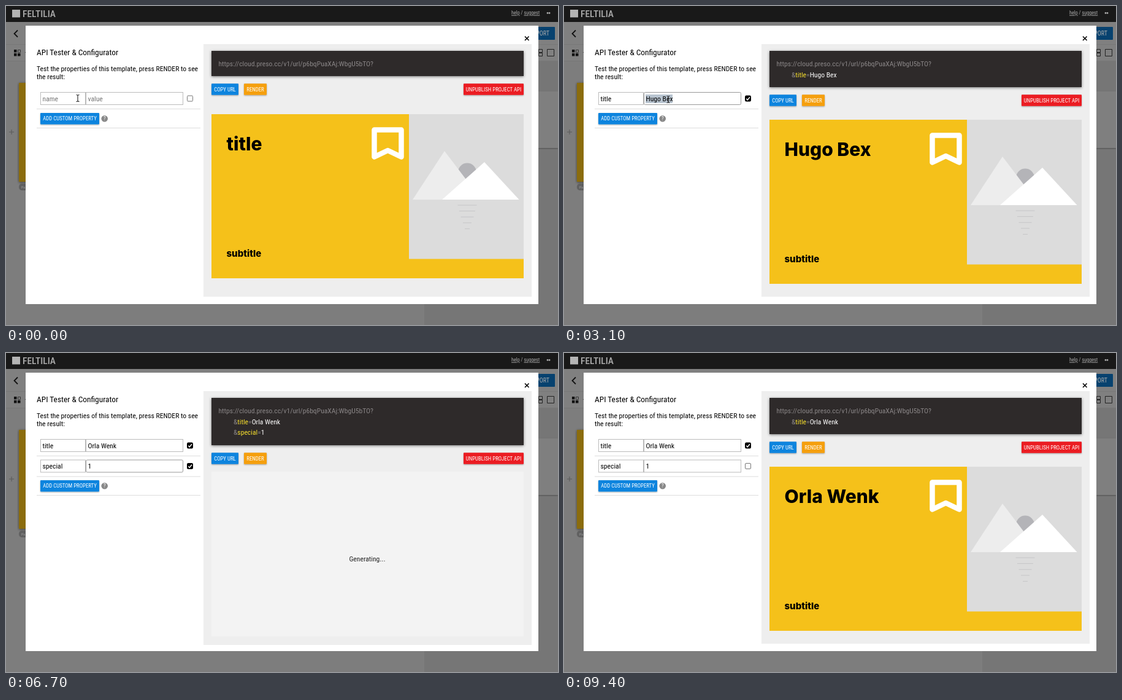
Animation of 900 by 519 pixels, one loop 9.5 s. Source, as an HTML page:

```html
<!DOCTYPE html>
<html lang="en">
<head>
<meta charset="utf-8">
<title>API Tester</title>
<style>
  html, body { margin: 0; width: 100%; height: 100%; overflow: hidden; background: #7d7d7d; }
  svg { display: block; font: 11.65px "Roboto Condensed", Roboto, sans-serif; font-stretch: condensed; }
  text { white-space: pre; }
  .card { font-family: Inter, sans-serif; font-stretch: normal; font-weight: 800; font-optical-sizing: none; }
</style>
</head>
<body>
<svg id="stage" width="900" height="519" viewBox="0 0 900 519">
  <defs>
    <filter id="soft" x="-10%" y="-30%" width="120%" height="160%">
      <feDropShadow dx="0" dy="1" stdDeviation="2.2" flood-opacity=".5"/>
    </filter>
    <filter id="low" x="-10%" y="-20%" width="120%" height="160%">
      <feDropShadow dx="0" dy="1" stdDeviation=".8" flood-opacity=".35"/>
    </filter>
  </defs>
  <g id="page"></g>
  <g id="live"></g>
</svg>
<script>
const LOOP = 9500, STEP = 100;
const FIRST = 'Hugo Bex', SECOND = 'Orla Wenk';
const BLUE = '#0a84de';

const rect = (x, y, w, h, fill, more = '') =>
  `<rect x="${x}" y="${y}" width="${w}" height="${h}" fill="${fill}" ${more}/>`;
const text = (x, y, s, fill = '#000', size = 11.65, more = '') =>
  `<text x="${x}" y="${y}" fill="${fill}" font-size="${size}" ${more}>${s}</text>`;
const line = (d, stroke, width = 1, more = '') =>
  `<path d="${d}" fill="none" stroke="${stroke}" stroke-width="${width}" ${more}/>`;
const button = (x, y, w, fill, label) =>
  rect(x, y, w, 18.5, fill, 'rx="1" filter="url(#low)"') +
  text(x + w / 2, y + 12.2, label, '#fff', 8.8, 'text-anchor="middle"');

const between = (t, from, to) => t >= from && t < to;
const typed = (t, s, start, step) => s.slice(0, Math.max(0, Math.floor((t - start) / step) + 1));

function page() {
  return rect(0, 0, 900, 519, '#7d7d7d') +
    rect(0, 26, 900, 63, '#808080') + rect(682, 89, 218, 430, '#767676') +
    line('M0 62.5H900M0 89.5H900', '#777') +
    rect(868, 139, 32, 92, '#7f7f7f', 'filter="url(#low)"') +
    rect(0, 0, 900, 26, '#191919') +
    rect(10, 6, 13, 12.5, '#b4b4b4') +
    text(27, 18, 'FELTILIA', '#aaa', 15.5, 'font-weight="500"') +
    text(824, 14, '<tspan text-decoration="underline">help</tspan> / <tspan text-decoration="underline">suggest</tspan>', '#aaa', 8.2) +
    '<circle cx="883" cy="11.5" r="1.4" fill="#aaa"/><circle cx="886" cy="11.5" r="1.4" fill="#aaa"/>' +
    line('M19 39.5L13.5 45L19 50.5', '#111', 1.8) +
    rect(13, 71, 4.5, 4.5, '#111') + rect(13, 77, 4.5, 4.5, '#111') + rect(19, 77, 4.5, 4.5, '#111') +
    line('M19.5 71.5h4v4h-4z', '#222', .8) + rect(31, 75, 2, 1, '#333') +
    rect(850, 34, 45, 21, '#07426f', 'rx="1"') +
    text(886, 48, 'EXPORT', '#aaa', 10, 'text-anchor="end"') +
    line('M868.5 70.5h6v5h-6zM868.5 76.5h6v5h-6zM882.5 70.5h11v11h-11z', '#222') +
    line('M5 205h8M9 201v8', '#5b5b5b') +
    rect(21, 125, 30, 161, '#8b6c0a', 'filter="url(#soft)"') +
    rect(21, 289, 40, 11, '#606060', 'rx="5"') + text(25, 297, 'Pa', '#999', 6) +
    rect(32, 32, 836, 453, '#fff') +
    line('M846 49.5l6.5 6.5m0-6.5l-6.5 6.5', '#000', 1.6) +
    text(50, 79.5, 'API Tester &amp; Configurator', '#000', 13.4) +
    text(50, 105.5, 'Test the properties of this template, press RENDER to see') +
    text(50, 119.3, 'the result:');
}

function checkbox(y, on) {
  return rect(295.5, y - 4.5, 9, 9, on ? '#000' : '#fff', `rx="1.5" stroke="${on ? '#000' : '#777'}"`) +
    (on ? line(`M297.3 ${y + .2}l2 2.2l3.6-4.6`, '#fff', 1.5) : '');
}

function field(x, y, w, value, hint, focus, caret, selected) {
  return rect(x + .5, y + .5, w - 1, 20, '#fff', focus ? 'rx="2" stroke="#999"' : 'stroke="#bbb"') +
    (selected ? rect(x + 3, y + 4, 44, 14, '#b8c4d0') : '') +
    text(x + 3.5, y + 14.5, (value || (caret ? '' : hint)) + (caret ? '<tspan dx="-1">|</tspan>' : ''),
      value ? '#000' : '#757575');
}

// start, end, row, column, time of the last key
const focusSpans = [
  [200, 650, 0, 0, 530], [650, 3300, 0, 1, 1120], [3300, 5000, 0, 1, 4100],
  [5200, 5900, 1, 0, 5800], [5900, 8200, 1, 1, 6000]
];

function form(t, names, values, checks) {
  const count = t >= 5000 ? 2 : 1;
  const [, , focusRow, focusCol, lastKey] = focusSpans.find(([from, to]) => between(t, from, to)) || [];
  const selected = between(t, 2900, 3300);
  const caretOn = !selected && (t < lastKey || (t - lastKey) % 1000 < 500);
  let out = '';
  for (let row = 0; row < count; row++) {
    const y = 140 + row * 33.5;
    [[56, 74, names, 'name'], [130, 159, values, 'value']].forEach(([x, w, list, hint], col) => {
      const active = focusRow === row && focusCol === col;
      out += field(x, y, w, list[row], hint, active, active && caretOn, active && selected);
    });
    out += checkbox(y + 10.5, checks[row]) + line(`M50 ${y + 27.5}H317`, '#ddd');
  }
  const y = 174 + (count - 1) * 33;
  return out + button(56, y, 96, BLUE, 'ADD CUSTOM PROPERTY') +
    `<circle cx="160.7" cy="${y + 9.2}" r="5.3" fill="#888"/>` +
    text(160.7, y + 12.4, '?', '#fff', 8.5, 'text-anchor="middle"') +
    line(`M50 ${y + 24.5}H317`, '#ddd');
}

function picture(x) {
  const ripples = [15.5, 13, 10.5, 7, 4].map((half, i) => `M${95 - half} ${148 + i * 9.6}h${half * 2}`).join('');
  return `<g transform="translate(${x})">` + rect(0, 0, 187, 235.5, '#dcdcdc') +
    '<circle cx="95" cy="94.5" r="15" fill="#b4b4b8"/>' +
    '<path d="M6 139L58 60L118 139z" fill="#ededed"/><path d="M54 139L123 78L179.5 139z" fill="#fff"/>' +
    line(ripples, '#c6c6c8') + '</g>';
}

function card(top, title, special) {
  const x = special ? 219.5 : 24.5;
  const icon = special
    ? 'M457 67.5C443 57 435.5 49 435.5 39C435.5 26.5 449.5 21 457 32C464.5 21 478.5 26.5 478.5 39C478.5 49 471 57 457 67.5z'
    : 'M265.5 25.5H309.5V69.5L287.5 59L265.5 69.5z';
  return `<g class="card" transform="translate(335 ${top})">` +
    rect(0, 0, 509, 267, special ? '#20b5bd' : '#f5c11a') + picture(special ? 0 : 322) +
    line(icon, '#fff', 8.5, 'stroke-linejoin="round"') +
    text(x, 58.7, title, '#000', 30) +
    text(x, 231.7, 'subtitle', '#000', 15) + '</g>';
}

function preview(t, names, values, checks) {
  const shown = [0, 1].filter(i => checks[i]);
  const n = shown.length, bottom = 114 + n * 18;
  const generating = [[1500, 1900], [4200, 4300], [6600, 7000], [8900, 9200]].some(([a, b]) => between(t, a, b));
  const title = t < 1900 ? 'title' : t < 4300 ? FIRST : SECOND;
  const query = shown.map((i, k) => text(371, 115.5 + k * 17.6,
    `&amp;<tspan fill="#f8e02e">${names[i]}</tspan>=<tspan fill="#fff">${values[i]}</tspan>`, '#8a8687')).join('');
  return rect(322, 62, 535, n > 1 ? 413 : 411, '#eee') +
    rect(335, 73, 509, bottom - 73, '#2e292a', 'filter="url(#soft)"') +
    text(346.5, 97.7, 'https://cloud.preso.cc/v1/url/p6bqPuaXAj:WbgU5bTO?', '#8a8687') + query +
    button(335, bottom + 12.3, 44, BLUE, 'COPY URL') +
    button(388, bottom + 12.3, 37, '#f59f0a', 'RENDER') +
    button(746, bottom + 12.3, 98, '#eb1c24', 'UNPUBLISH PROJECT API') +
    (generating
      ? rect(335, bottom + 43, 509, 418 - bottom, '#f3f3f3') +
        text(589, bottom + 189, 'Generating...', '#222', 11.65, 'text-anchor="middle"')
      : card(176 + n * 9, title, between(t, 7000, 8900)));
}

// pointer trips: time, x, y
const trips = [
  [[0, 117, 150], [250, 117, 150]],
  [[2200, 330, 235], [2700, 136, 151], [2800, 136, 151], [3000, 170, 152], [3200, 170, 152]],
  [[4600, 190, 165], [4900, 100, 184], [5050, 100, 184], [5200, 88, 184], [5400, 88, 184]],
  [[7600, 245, 290], [7800, 269, 234], [8150, 300, 184], [8350, 300, 184], [8700, 406, 154], [8900, 406, 154], [9300, 430, -20]]
];

function pointer(t) {
  const trip = trips.find(p => between(t, p[0][0], p[p.length - 1][0]));
  if (!trip) return '';
  const i = trip.findIndex((p, k) => between(t, p[0], trip[k + 1][0]));
  const [t0, x0, y0] = trip[i], [t1, x1, y1] = trip[i + 1];
  const k = .5 - Math.cos(Math.PI * (t - t0) / (t1 - t0)) / 2;
  const x = x0 + (x1 - x0) * k, y = y0 + (y1 - y0) * k;
  const overField = between(x, 56, 289) && (between(y, 140, 161) || t >= 5100 && between(y, 174, 194));
  const shape = overField
    ? line('M-2.5-5.5Q0-5.5 0-4Q0-5.5 2.5-5.5M0-4V4M-2.5 5.5Q0 5.5 0 4Q0 5.5 2.5 5.5', '#222', 1.1)
    : '<path d="M0 0V11.5L2.6 9L4.4 13L6.3 12.2L4.6 8.3H8z" transform="scale(.9)" fill="#000" stroke="#fff" stroke-width=".9"/>';
  return `<g transform="translate(${x} ${y})">${shape}</g>`;
}

function scene(t) {
  const names = [typed(t, 'title', 250, 70), typed(t, 'special', 5300, 80)];
  const values = [t < 3300 ? typed(t, FIRST, 700, 60) : typed(t, SECOND, 3300, 100), t >= 6000 ? '1' : ''];
  const checks = [t >= 600, between(t, 5900, 8300)];
  return form(t, names, values, checks) + preview(t, names, values, checks) + pointer(t);
}

const live = document.getElementById('live');
document.getElementById('page').innerHTML = page();
let shownStep = -1;
function tick() {
  const step = Math.floor(performance.now() % LOOP / STEP);
  if (step !== shownStep) live.innerHTML = scene((shownStep = step) * STEP);
  requestAnimationFrame(tick);
}
tick();
</script>
</body>
</html>
```
